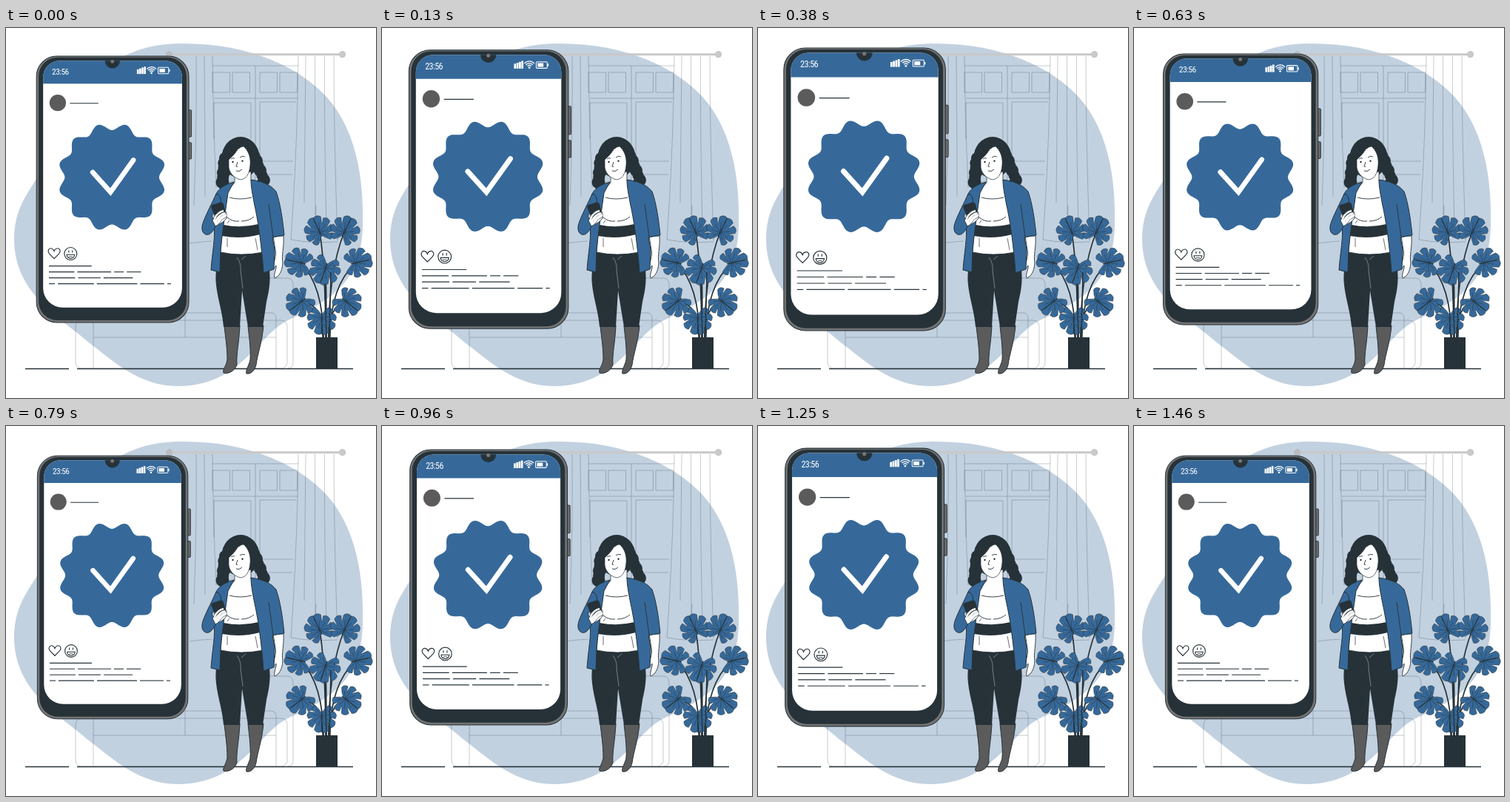
An HTML page with a canvas for the animation above (1500 ms loop, 500 by 500 pixels).

```html
<!DOCTYPE html>
<html lang="en">
<head>
<meta charset="utf-8">
<title>Verified profile</title>
<style>
html, body { margin: 0; width: 100%; height: 100%; overflow: hidden; background: #fff; }
canvas { display: block; width: 500px; height: 500px; }
</style>
</head>
<body>
<canvas id="stage"></canvas>
<script>
const canvas = document.getElementById('stage');
const ctx = canvas.getContext('2d');
const dpr = window.devicePixelRatio || 1;
canvas.width = canvas.height = 500 * dpr;

const BLUE = '#36699a', PALE = '#c2d1e0', DARK = '#263238', GREY = '#5b5b5b', WHITE = '#fff';
const FAINT = 'rgba(38,50,56,.25)';
const LOOP = 1500, STEPS = 36, TAU = Math.PI * 2;

// Linear rise from 0 to 1, then linear fall back to 0.
function pulse(t, rise, fall) {
  return Math.max(0, Math.min(t / rise, 1 - (t - rise) / fall));
}

function beatScale(t) {
  const phase = (t + 32) % LOOP;
  return 1 + 0.1 * (pulse(phase, 265, 550) + pulse(phase - 852, 300, 300));
}

function shape(d, fill, stroke, width = 1) {
  const path = typeof d === 'string' ? new Path2D(d) : d;
  if (fill) { ctx.fillStyle = fill; ctx.fill(path); }
  if (stroke) { ctx.strokeStyle = stroke; ctx.lineWidth = width; ctx.stroke(path); }
}

const line = (d, width, color = DARK) => shape(d, null, color, width);

function disc(x, y, rx, fill, stroke, width, ry = rx) {
  const p = new Path2D();
  p.ellipse(x, y, rx, ry, 0, 0, TAU);
  shape(p, fill, stroke, width);
}

function rounded(x0, y0, x1, y1, radius) {
  const p = new Path2D();
  p.roundRect(x0, y0, x1 - x0, y1 - y0, radius);
  return p;
}

function box(x0, y0, x1, y1, radius, fill, stroke, width) {
  shape(rounded(x0, y0, x1, y1, radius), fill, stroke, width);
}

function room() {
  shape(`M235 21C330 20 398 54 434 94C472 137 484 200 482 268C480 330 455 362 385 393
    C340 412 320 484 232 484C180 484 145 450 112 425C75 392 11 360 11 285
    C11 230 45 210 62 165C92 75 150 21 235 21Z`, PALE);
  // cupboard
  line('M279 51H395M281 95H394M337 51V205M281 150V101H331V150M343 250V100H392M343 180H388M337 198H387', 1, FAINT);
  for (const x of [279, 306, 343, 370]) box(x, 60, x + 23.5, 87, 0, null, FAINT);
  // curtains
  for (let i = 0; i < 3; i++) line(`M${257 + 11 * i} 38Q${258 + 11 * i} 130 ${254 + 15 * i} ${240 - 12 * i}`, 1, FAINT);
  for (let i = 0; i < 4; i++) line(`M${405 + 12.700 * i} 38Q${404 + 13 * i} 140 ${403 + 15 * i} ${236 + 17 * i}`, 1, FAINT);
  line('M395 38C394 130 390 215 385 286Q410 291 448 289M419 240L417 282M248 291Q262 289 278 288', 1, FAINT);
  // sofa
  box(94, 395, 380, 460, 8, null, FAINT);
  line('M355 338H379Q388 338 388 347V452Q388 460 380 460M118 460V385H358Q365 385 365 393V460M118 418H365M242 385V418', 1, FAINT);
  // curtain rod and floor
  box(220, 34.2, 455, 37.2, 0, '#c9c9c9');
  disc(220.5, 35.7, 4.7, '#b9bcc0');
  disc(454.6, 35.7, 4.7, '#c9c9c9');
  line('M26 460.5H85M96 460.5H469', 1.3);
}

// Split leaf: swept lobes on both sides of a midrib that points along the angle.
function leaf(x, y, r, angle) {
  const lobes = 8, span = 5.6 / lobes, blade = new Path2D(), veins = new Path2D();
  const polar = (a, d) => [Math.cos(a) * d, Math.sin(a) * d];
  for (let i = 0; i < lobes; i++) {
    const a = (i - lobes / 2) * span, b = a + span, mid = a + span / 2;
    const lean = -0.12 * Math.sign(mid);
    const len = r * (0.95 + 0.12 * Math.cos(mid));
    blade.lineTo(...polar(a + 0.04, len * 0.58));
    blade.lineTo(...polar(a + 0.1 + lean, len * 0.93));
    blade.quadraticCurveTo(...polar(mid + lean, len * 1.12), ...polar(b - 0.08 + lean, len * 0.95));
    blade.lineTo(...polar(b - 0.06, len * 0.58));
    veins.moveTo(0, 0);
    veins.lineTo(...polar(mid, len * 0.62));
  }
  blade.lineTo(-r * 0.2, 0);
  blade.closePath();
  ctx.save();
  ctx.translate(x, y);
  ctx.rotate(angle);
  shape(blade, BLUE, DARK, 0.5);
  line(veins, 0.5);
  line(`M${-r * 0.3} 0H${r * 0.85}`, 1.2);
  ctx.restore();
}

function plant() {
  const leaves = [[432, 324, 22, 1.9]];
  for (let i = 0; i < 7; i++) {
    const a = Math.PI / 2 + i * TAU / 7;
    const rise = -61 * Math.sin(a);
    leaves.push([434 + 38 * Math.cos(a) + 0.12 * rise, 331 - rise, 21, a]);
  }
  for (const [x, y] of leaves) {
    const foot = 433 + (x - 433) * 0.12;
    line(`M${foot} 420Q${foot} ${y / 2 + 190} ${x} ${y}`, 1.7);
  }
  for (const l of leaves) leaf(...l);
  line('M428 418L427 400M433 418L431 345M437 418L439 330', 1.4);
  box(419, 418, 448, 460.5, 0, DARK);
}

function hair() {
  disc(317, 175, 25.5, DARK, null, 0, 28);
  for (let i = 0; i < 6; i++) {
    disc(296 - i * 0.7, 176 + i * 6.5, 8 + i % 2, DARK);
    disc(336 + i * 2.5, 173 + i * 6.5, 7.5 + i % 2, DARK);
  }
}

function woman() {
  // boots and trousers
  shape('M295 402H316C315 425 311 440 312 455C309 464 300 468 294 466C292 463 298 456 299 448C299 430 296 415 295 402Z', GREY, DARK);
  shape('M327 402H348C346 425 340 440 338 455C336 464 330 468 325 467C323 463 329 455 330 448C331 430 328 415 327 402Z', GREY, DARK);
  shape('M289 302L350 304C360 328 357 350 352 370L347 404H327L319 355L316 404H294C292 375 279 350 285 322Z', DARK);
  line('M312 310Q318 318 317 328L320 352M324 308L318 313', 0.8, '#8a9299');
  // hand hanging down
  shape('M361 281H375C376 298 372 306 374 318C373 329 369 336 363 338C361 334 366 325 365 321L361 326C361 318 366 307 364 300Z', WHITE, DARK, 0.9);
  // head and torso
  hair();
  shape('M309 198V209L297 222L293 265L290 303Q318 309 347 303L342 262L334 214L331 206V194Z', WHITE, DARK, 0.8);
  line('M302 229Q316 233 332 229M299 256Q306 262 315 261M318 261Q328 261 335 255', 0.9);
  shape('M294 266Q318 271 341 265L343 279Q318 286 292 281Z', DARK);
  line('M299 284V296M337 284L340 300M302 260L299 264', 0.7);
  shape('M301 178Q310 170 313 164Q318 160 321 160C327 165 331 174 330 185C329 197 325 204 317 205C308 203 302 196 301 188Z', WHITE, DARK, 0.7);
  line('M304 177Q306 175 309 176M316 175Q319 172 323 174M313 181L311 187L313 187.5M311 193Q315 195 319 191', 0.9);
  disc(306.5, 181, 1.2, DARK);
  disc(319.5, 179.8, 1.2, DARK);
  // cardigan
  shape('M308 208L300 223C297 245 293 270 290 300L289 330L277 327C279 300 283 285 281 266L284 224C288 216 297 211 308 208Z', BLUE, DARK);
  shape('M331 205C345 207 357 211 365 221C371 238 374 260 376 280L360 283L363 300L362 326L348 331C346 300 341 262 336 240C333 225 331 214 331 205Z', BLUE, DARK);
  line('M355 238L361 283', 0.9);
  shape('M284 224C278 238 272 248 267 261C263 271 265 277 270 279C277 281 281 272 285 265L278 254L290 238Q292 226 284 224Z', BLUE, DARK);
  // hand with phone
  shape('M279 260L287 248Q291 244 296 246Q299 250 298 257Q294 263 288 265L283 268Z', WHITE, DARK, 0.9);
  shape('M279 239L290 235.500Q293 235 294 238L297 250L284 258L277 242Q277 240 279 239Z', DARK);
  for (let i = 0; i < 3; i++) {
    ctx.save();
    ctx.translate(i * 2, i * 3);
    line('M282 257Q286 249 294 247', 2.4, WHITE);
    line('M283 259Q288 251 295 249', 0.6);
    ctx.restore();
  }
}

function badge() {
  const p = new Path2D();
  for (let a = 0; a < TAU; a += TAU / 240) {
    const r = 67.6 - 4.6 * Math.cos(12 * a);
    p.lineTo(143.2 + r * Math.sin(a), 201.9 - r * Math.cos(a));
  }
  p.closePath();
  shape(p, BLUE);
  ctx.lineCap = 'round';
  line('M117.5 195.300L141.300 221.600L171.800 179', 6.6, WHITE);
  ctx.lineCap = 'butt';
}

function statusBar() {
  ctx.fillStyle = WHITE;
  ctx.font = 'extra-condensed 11.5px "Roboto Condensed", "Open Sans Condensed", "Noto Sans", "Open Sans", sans-serif';
  ctx.letterSpacing = '-0.6px';
  ctx.fillText('23:56', 63, 64.7);
  for (let i = 0; i < 4; i++) ctx.fillRect(176.5 + i * 3.1, 57.8 - i * 1.2, 2.6, 6.2 + i * 1.2);
  for (let r = 3.2; r < 9; r += 2.6) {
    const p = new Path2D();
    p.arc(196, 63, r, -Math.PI * 0.77, -Math.PI * 0.23);
    line(p, 1.3, WHITE);
  }
  disc(196, 62.8, 1.3, WHITE);
  box(204.8, 55.3, 218.8, 63.5, 1, null, WHITE, 1);
  box(206.6, 57, 214, 61.8, 0, WHITE);
  box(219.2, 57.8, 220.6, 61, 0, WHITE);
}

// Word widths per row stand in for the caption.
function caption() {
  const rows = [[57], [34, 45, 13, 19], [35, 30, 39], [8, 48, 54, 32, 5]];
  rows.forEach((words, i) => {
    let x = 59;
    for (const w of words) {
      line(`M${x} ${320.4 + 7.9 * i}h${w}`, 1.1);
      x += w + 4;
    }
  });
}

function post() {
  disc(70.8, 102.6, 11, GREY);
  line('M87 103.2H125', 1.1);
  badge();
  line('M66 310.500L59.600 304C56 299.500 60 296 62.500 297Q65 297.500 66 300.500Q67 297.500 69.500 297C72.500 296 76 299.500 72.400 304Z', 1.1);
  disc(88, 304, 8.4, null, DARK, 1.1);
  line('M82.8 305.200H93.200C93 312 83 312 82.800 305.200ZM85.600 299.500V302.500M90.400 299.500V302.500', 1.1);
  line('M85 308.400Q88 306.800 91 308.400', 0.8);
  caption();
}

function phone(scale) {
  ctx.save();
  ctx.translate(144, 218);
  ctx.scale(scale, scale);
  ctx.translate(-144, -218);
  box(243, 112, 249.3, 148, 1, '#6d6d6d', DARK, 0.9);
  box(243, 155.5, 249.3, 177.5, 1, '#6d6d6d', DARK, 0.9);
  box(42.4, 40.2, 245.8, 395.8, 27, '#737373', DARK, 1);
  box(45.3, 42, 242.7, 392.8, 25, DARK);
  const screen = rounded(51.3, 46.3, 236.8, 375.8, [22, 22, 26, 26]);
  shape(screen, WHITE);
  ctx.save();
  ctx.clip(screen);
  box(50, 44, 238, 77, 0, BLUE);
  disc(143.8, 46.5, 10, DARK);
  ctx.restore();
  disc(143.7, 47.4, 2.4, '#777');
  statusBar();
  post();
  ctx.restore();
}

function draw(now) {
  const step = Math.floor((now % LOOP + 4) * STEPS / LOOP) % STEPS;
  ctx.setTransform(dpr, 0, 0, dpr, 0, 0);
  ctx.fillStyle = WHITE;
  ctx.fillRect(0, 0, 500, 500);
  room();
  plant();
  woman();
  phone(beatScale(step * LOOP / STEPS));
}

let start = null;
function tick(now) {
  if (start === null) start = now;
  draw(Math.max(0, now - start));
  requestAnimationFrame(tick);
}
draw(0);
requestAnimationFrame(tick);
</script>
</body>
</html>
```
